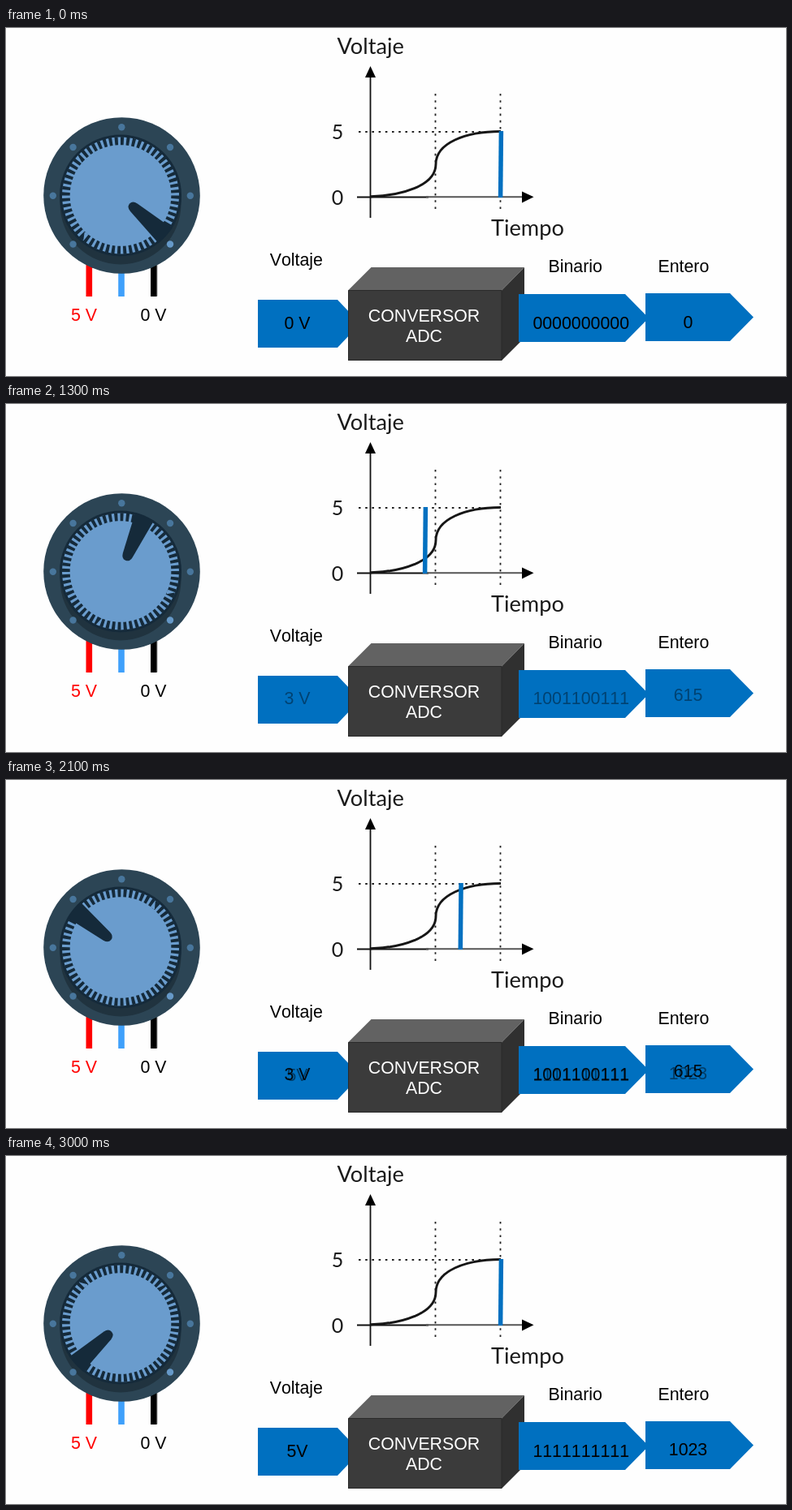
Animation of 960x429 px, one loop 5 s. Source, as an HTML page:

```html
<!DOCTYPE html>
<html lang="es">
<head>
<meta charset="utf-8">
<title>Conversor ADC</title>
<style>
  html, body { margin: 0; width: 100%; height: 100%; overflow: hidden; background: #fefefe; }
  svg { display: block; width: 100%; height: 100%; }
  text { font: 21.33px "Liberation Sans", Arial, sans-serif; font-kerning: none; }
  .mid { text-anchor: middle; }
  .axis text { font: 27.2px Lato, sans-serif; fill: #1a1a1a; }
  .axis .num { font-size: 25px; }
  .dots { stroke: #222; stroke-width: 1.8; fill: none; stroke-dasharray: 2.6 5.6; }
</style>
</head>
<body>
<svg viewBox="0 0 960 429">
  <!-- potentiometer -->
  <g stroke-width="7.6">
    <path d="M183 290V330.5" stroke="#c4c4c4"/>
    <path d="M102.3 290V331" stroke="#f00"/>
    <path d="M142 290V331" stroke="#3fa0fb"/>
    <path d="M181.8 290V331" stroke="#000"/>
  </g>
  <circle cx="142.5" cy="206.5" r="96.3" fill="#2c4555"/>
  <circle cx="141" cy="217" r="74.5" fill="#20333f"/>
  <g id="screws"></g>
  <circle cx="141" cy="206.5" r="75" fill="#152a3a"/>
  <g id="knob">
    <circle r="72" fill="#6a9ccd"/>
    <circle r="67.3" fill="none" stroke="#152a3a" stroke-width="10" pathLength="120" stroke-dasharray="1.1 .9"/>
    <path d="M22 -6.5L74 -12.5V12.5L22 6.5Q15 5.5 15 0T22 -6.5Z" fill="#152a3a"/>
  </g>
  <text class="mid" x="96" y="361" fill="#f00">5 V</text>
  <text class="mid" x="181.5" y="361">0 V</text>

  <!-- graph -->
  <g class="axis">
    <path class="dots" d="M528.5 81V226M608.5 81V226M434 128H608"/>
    <path d="M448.5 58V234M432 208.5H520" stroke="#111" stroke-width="1.8"/>
    <path d="M517 208.3H638" stroke="#555" stroke-width="2"/>
    <path d="M448.5 47L455 61H442ZM649.5 208.3L635 201.5V215.5Z" fill="#000"/>
    <path d="M449 207.7C485 207 529 195 529 168C529 142 565 127.5 609 127.5"
      fill="none" stroke="#161616" stroke-width="2.9"/>
    <text x="407.5" y="32">Voltaje</text>
    <text x="597" y="256">Tiempo</text>
    <text class="mid num" x="408" y="137">5</text>
    <text class="mid num" x="408" y="217.5">0</text>
  </g>
  <path id="bar" d="M.4 127L-.4 209" stroke="#0070c0" stroke-width="5.5"/>

  <!-- converter -->
  <path d="M310 335H408L436 364.5L408 394H310Z" fill="#0070c0"/>
  <path d="M421 323.5L449.5 295H638L610 323.5Z" fill="#626262"/>
  <path d="M610 323.5L638 295V382L610 410Z" fill="#303030"/>
  <path d="M421 323.5H610V410H421Z" fill="#3b3b3b"/>
  <path d="M421.5 410V323.5H610V409.5H421" fill="none" stroke="#2a2a2a"/>
  <path d="M631 328H762L791 357.5L762 387H631ZM787 327H891L920 356.5L891 386H787Z" fill="#0070c0"/>
  <g class="mid" fill="#fff">
    <text x="514.5" y="362">CONVERSOR</text>
    <text x="514.5" y="387">ADC</text>
  </g>
  <text x="324.7" y="293">Voltaje</text>
  <text x="667.5" y="301">Binario</text>
  <text x="802.5" y="301">Entero</text>
  <g id="values" class="mid"></g>
</svg>
<script>
const NS = "http://www.w3.org/2000/svg";
const $ = id => document.getElementById(id);

function add(parent, tag, attrs, text = "") {
  const el = document.createElementNS(NS, tag);
  for (const k in attrs) el.setAttribute(k, attrs[k]);
  el.textContent = text;
  return parent.appendChild(el);
}

// Linear interpolation through [x, y] points
function lerp(points, x) {
  if (x <= points[0][0]) return points[0][1];
  for (let i = 1; i < points.length; i++) {
    const [x0, y0] = points[i - 1], [x1, y1] = points[i];
    if (x <= x1) return y0 + (y1 - y0) * (x - x0) / (x1 - x0);
  }
  return points[points.length - 1][1];
}

// Seven screws; the place at the bottom stays empty
for (let i = 0; i < 8; i++) {
  if (i === 2) continue;
  const a = i * Math.PI / 4;
  add($("screws"), "circle", {
    cx: 142.3 + 84.5 * Math.cos(a), cy: 206.7 + 84.5 * Math.sin(a),
    r: 4.2, fill: i === 1 ? "#6699c8" : "#48769c"
  });
}

// Readings: texts, baselines, and opacity by tick
const readings = [
  { text: ["0 V", "0000000000", "0"], y: [371, 371, 370],
    fade: [[4, 1], [5, .9], [8, 0]] },
  { text: ["1 V", "0011001100", "204"], y: [371, 371, 370],
    fade: [[4, 0], [5, .35], [8, 1], [9, 1], [11, 0], [13, 0], [15, .3], [16, .3], [18, 0]] },
  { text: ["3 V", "1001100111", "615"], y: [370, 369.5, 366],
    fade: [[12, 0], [13, .4], [16, .88], [18, 1], [20, 1], [21, .9], [24, 0]] },
  { text: ["5V", "1111111111", "1023"], y: [371, 371, 369],
    fade: [[19, 0], [21, .45], [24, 1]] }
];
const columns = [358.5, 707.7, 839.5];
for (const r of readings) {
  r.el = add($("values"), "g", {});
  r.text.forEach((s, i) => add(r.el, "text", { x: columns[i], y: r.y[i] }, s));
}

const turn = [[0, 42], [1, 38], [5, .8], [12, -66.4], [15, -95.2], [20, -141], [24, -175.8], [29, -222.6]];
const sweep = [[1, 454], [5, 476], [12, 516], [15, 532], [20, 559.7], [24, 581], [29, 609]];

function draw(ms) {
  const tick = Math.min(30, Math.floor(ms % 5000 / 100));
  const step = tick < 12 ? tick : tick - 1; // one tick of rest at 1200 ms
  const x = tick ? lerp(sweep, step) : 609;
  $("knob").setAttribute("transform", `translate(141 206.5) rotate(${lerp(turn, step)})`);
  $("bar").setAttribute("transform", `translate(${x} 0)`);
  for (const r of readings) r.el.setAttribute("opacity", lerp(r.fade, tick));
}

let start;
function loop(now) {
  start ??= now;
  draw(now - start);
  requestAnimationFrame(loop);
}
draw(0);
requestAnimationFrame(loop);
</script>
</body>
</html>
```
